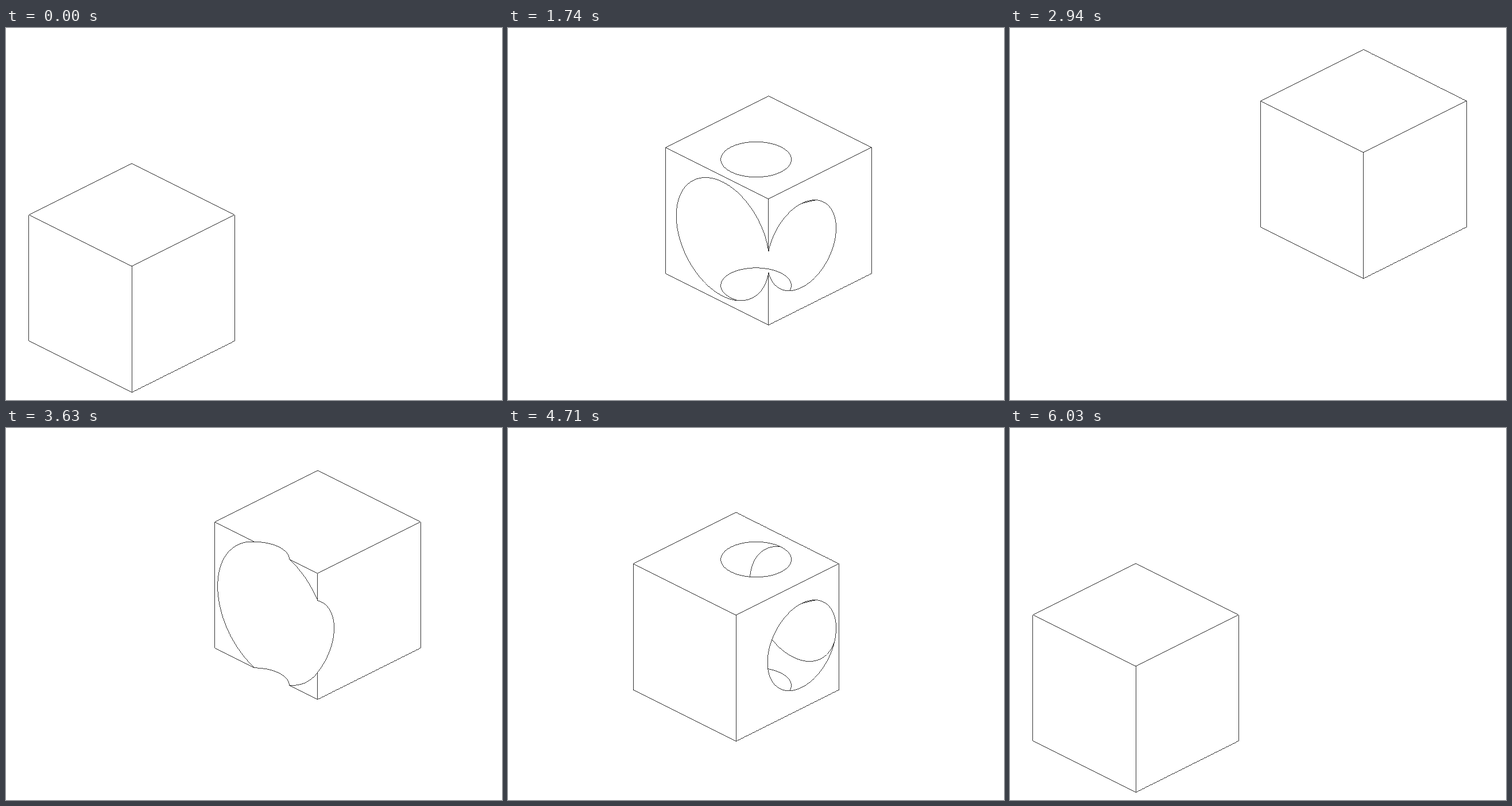
Recreate the animation shown at these times as an HTML page with a canvas. Size 864 px wide and 648 px high, loop 6060 ms.

```html
<!DOCTYPE html>
<html lang="en">
<head>
<meta charset="utf-8">
<title>Cube passing through a ball</title>
<style>
  html, body { margin: 0; width: 100%; height: 100%; overflow: hidden; background: #fff; }
  canvas { display: block; width: 864px; height: 648px; }
</style>
</head>
<body>
<canvas id="stage" width="864" height="648"></canvas>
<script>
const ctx = document.getElementById('stage').getContext('2d');

const STEP_MS = 30, STEPS = 202;
const HALF = 9, BALL = 10;            // cube half side and ball radius, in units
const FLAT = 9.958, RISE = 12.196;    // pixels per unit along a floor axis and upwards
const CUBE_Y = -1, START_X = -20.38, SPEED = 0.4064;
const BALL_X = 432.1, BALL_Y = 338.8; // ball centre on the stage
const TO_EYE = [-Math.sqrt(0.375), Math.sqrt(0.375), 0.5];
const SAMPLES = 2000, EPS = 1e-6;
const INK = '#333', PAPER = '#fff';

const start = performance.now();
let centre;

const dot = (a, b) => a[0] * b[0] + a[1] * b[1] + a[2] * b[2];

const project = ([x, y, z]) => [
  BALL_X + FLAT * (x + y),
  BALL_Y + FLAT / 2 * (y - x) - RISE * z
];

const inCube = p => p.every((v, k) => Math.abs(v - centre[k]) <= HALF + EPS);
const inBall = p => dot(p, p) < BALL * BALL;

// Distance from a point of the cube to where its sight line leaves the cube.
function exitDistance(p) {
  return Math.min(...TO_EYE.map((d, k) =>
    (centre[k] + Math.sign(d) * HALF - p[k]) / d));
}

// A rim point shows if the hollow carries its sight line out of the cube.
const rimVisible = p =>
  inCube(p) && Math.max(0, -2 * dot(p, TO_EYE)) >= exitDistance(p) - EPS;

// One pixel wide trace: a pixel is set where the line crosses
// the middle of a column (flat parts) or of a row (steep parts).
function trace(pointAt, shows) {
  let last = null;
  for (let i = 0; i <= SAMPLES; i++) {
    const p = pointAt(i / SAMPLES);
    if (!shows(p)) { last = null; continue; }
    const q = project(p);
    if (last) {
      const flat = Math.abs(q[0] - last[0]) >= Math.abs(q[1] - last[1]);
      const m = flat ? 0 : 1;
      if (Math.round(q[m]) !== Math.round(last[m])) {
        ctx.fillRect(Math.floor(q[0]), Math.floor(q[1]), 1, 1);
      }
    }
    last = q;
  }
}

function drawEdges(axis) {
  const u = (axis + 1) % 3, v = (axis + 2) % 3;
  for (const a of [-1, 1]) for (const b of [-1, 1]) {
    const hidden = a * TO_EYE[u] < 0 && b * TO_EYE[v] < 0;
    if (hidden) continue;
    trace(t => {
      const p = [];
      p[axis] = centre[axis] + HALF * (2 * t - 1);
      p[u] = centre[u] + HALF * a;
      p[v] = centre[v] + HALF * b;
      return p;
    }, p => !inBall(p));
  }
}

function drawRims(axis) {
  const u = (axis + 1) % 3, v = (axis + 2) % 3;
  for (const side of [-1, 1]) {
    const level = centre[axis] + side * HALF;
    const r2 = BALL * BALL - level * level;
    if (r2 < 0.01) continue;
    const r = Math.sqrt(r2);
    trace(t => {
      const p = [], angle = t * 2 * Math.PI;
      p[axis] = level;
      p[u] = r * Math.cos(angle);
      p[v] = r * Math.sin(angle);
      return p;
    }, rimVisible);
  }
}

// The short flat facet at the top of the right-hand rim.
function drawFacet() {
  const angle = 66 * Math.PI / 180, r = 6;
  const x = r * Math.cos(angle), z = r * Math.sin(angle);
  trace(t => [x * t, centre[1] + HALF, r + (z - r) * t], inCube);
}

function draw() {
  const step = Math.floor((performance.now() - start) / STEP_MS) % STEPS;
  const travel = Math.min(step, STEPS - 1 - step);
  centre = [START_X + SPEED * travel, CUBE_Y, 0];

  ctx.fillStyle = PAPER;
  ctx.fillRect(0, 0, 864, 648);
  ctx.fillStyle = INK;
  for (let axis = 0; axis < 3; axis++) {
    drawEdges(axis);
    drawRims(axis);
  }
  drawFacet();
  requestAnimationFrame(draw);
}
draw();
</script>
</body>
</html>
```
